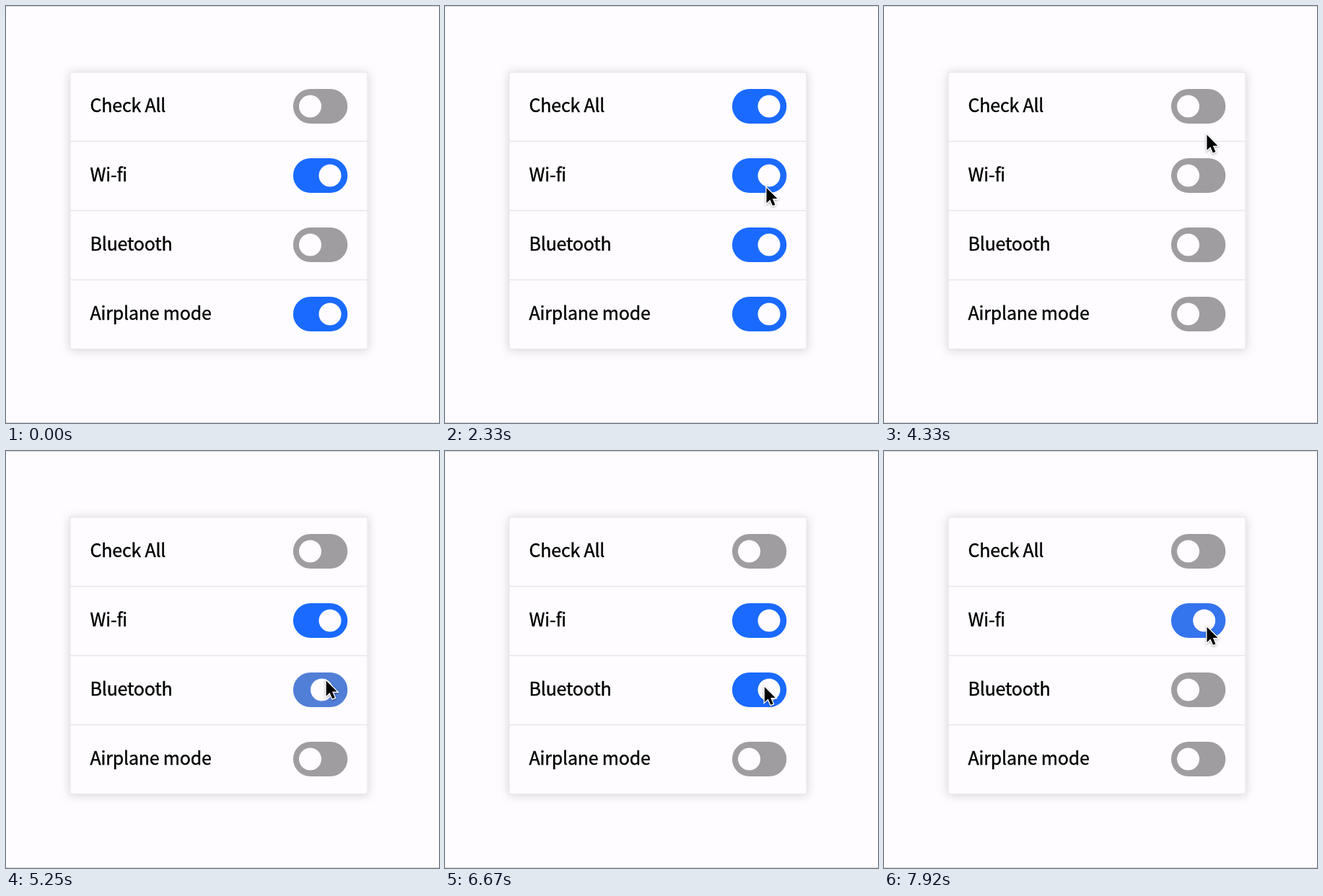
Animation of 600x578 px, one loop 8 s. Source, as an HTML page:

```html
<!DOCTYPE html>
<html lang="en">
<head>
<meta charset="utf-8">
<title>Toggle list</title>
<style>
  html, body { margin: 0; width: 100%; height: 100%; overflow: hidden; background: #fefcff; }
  svg { display: block; width: 600px; height: 578px; }
  text {
    font: 400 25px "Noto Sans CJK KR", "Noto Sans CJK JP", "Noto Sans CJK", "Noto Sans", sans-serif;
    letter-spacing: -.2px; fill: #000; stroke: #000; stroke-width: .4;
  }
  .card { fill: #fefcff; filter: drop-shadow(0 1px 7px rgba(0, 0, 0, .17)); }
  .line { fill: #e8e6e9; }
  .cursor { filter: drop-shadow(0 1.5px 1.5px rgba(0, 0, 0, .35)); }
</style>
</head>
<body>
<svg id="stage" viewBox="0 0 600 578">
  <rect width="600" height="578" fill="#fefcff"/>
  <rect width="600" height="1" fill="#d8d7d9"/>
  <rect y="577" width="600" height="1" fill="#d8d7d9"/>
  <rect class="card" x="88.5" y="91.5" width="413" height="384.5"/>
  <rect x="89" y="92" width="412" height="383.5" fill="none" stroke="#e8e6e9" stroke-width="1.3"/>
  <g id="rows"></g>
  <g id="cursor" class="cursor">
    <path d="M0 0V23.5L5.4 18.4L9.4 27.6L13.3 26L9.3 16.8H16.6Z" transform="scale(.9)"
          fill="#000" stroke="#fff" stroke-width="3" paint-order="stroke"/>
  </g>
</svg>
<script>
const LOOP = 8000, STEP = 1000 / 12, FADE = 400;
const ROW = 96, TOP = 139;
const KNOB_OFF = 421.5, KNOB_ON = 449;
const GREY = [159, 157, 160], BLUE = [26, 106, 255];

// Each row: label, state at the start, times at which it flips
const rows = [
  { label: 'Check All', on: false, flips: [1900, 2500, 3350, 3900, 5680, 6200] },
  { label: 'Wi-fi', on: true, flips: [2500, 3350, 3900, 4600, 7855] },
  { label: 'Bluetooth', on: false, flips: [1900, 3900, 5115, 6850] },
  { label: 'Airplane mode', on: true, flips: [3900, 5680, 6200] }
];

// Pointer moves: start, end, target x, target y
const entry = [612, 215];
const moves = [
  [1200, 1880, 449, 138],
  [2020, 2300, 445.5, 252],
  [2850, 3220, 448.5, 137.5],
  [4200, 4500, 446, 236],
  [4750, 5020, 443.7, 318.5],
  [5300, 5580, 443.5, 424],
  [6350, 6640, 442.8, 327],
  [7050, 7400, 447.5, 244]
];

const lerp = (a, b, k) => a + (b - a) * k;
const clamp = k => Math.min(1, Math.max(0, k));
const smooth = k => k * k * (3 - 2 * k);

// cubic-bezier(.25, .1, .25, 1)
function ease(x) {
  if (x <= 0 || x >= 1) return clamp(x);
  const curve = (a, b, u) => 3 * a * u * (1 - u) ** 2 + 3 * b * u * u * (1 - u) + u ** 3;
  let lo = 0, hi = 1;
  for (let i = 0; i < 20; i++) {
    const mid = (lo + hi) / 2;
    if (curve(.25, .25, mid) < x) lo = mid; else hi = mid;
  }
  return curve(.1, 1, lo);
}

function add(parent, tag, attrs) {
  const el = document.createElementNS('http://www.w3.org/2000/svg', tag);
  for (const key in attrs) el.setAttribute(key, attrs[key]);
  return parent.appendChild(el);
}

const list = document.getElementById('rows');
const cursor = document.getElementById('cursor');

rows.forEach((row, i) => {
  const y = TOP + i * ROW;
  if (i) add(list, 'rect', { class: 'line', x: 89, y: y - 48.2, width: 412, height: 1.5 });
  add(list, 'text', { x: 116.5, y: y + 8 }).textContent = row.label;
  row.track = add(list, 'rect', { x: 397.9, y: y - 24, width: 75.4, height: 48, rx: 24 });
  row.knob = add(list, 'circle', { cy: y, r: 15.5, fill: '#fefcff' });
});

function level(row, t) {
  let value = +row.on, goal = value;
  for (const at of row.flips) {
    if (t < at) break;
    goal = 1 - goal;
    value = lerp(1 - goal, goal, ease((t - at) / FADE));
  }
  return value;
}

function pointer(t) {
  let [x, y] = entry;
  for (const [start, end, toX, toY] of moves) {
    const k = smooth(clamp((t - start) / (end - start)));
    x = lerp(x, toX, k);
    y = lerp(y, toY, k);
  }
  return [x, y];
}

function draw(ms) {
  const t = Math.floor((ms % LOOP + 4) / STEP) * STEP % LOOP;
  for (const row of rows) {
    const k = level(row, t);
    const rgb = GREY.map((c, i) => Math.round(lerp(c, BLUE[i], k)));
    row.track.setAttribute('fill', `rgb(${rgb})`);
    row.knob.setAttribute('cx', lerp(KNOB_OFF, KNOB_ON, k));
  }
  const [x, y] = pointer(t);
  cursor.setAttribute('transform', `translate(${x} ${y})`);
}

const begin = performance.now();
function tick() {
  draw(performance.now() - begin);
  requestAnimationFrame(tick);
}
tick();
</script>
</body>
</html>
```
